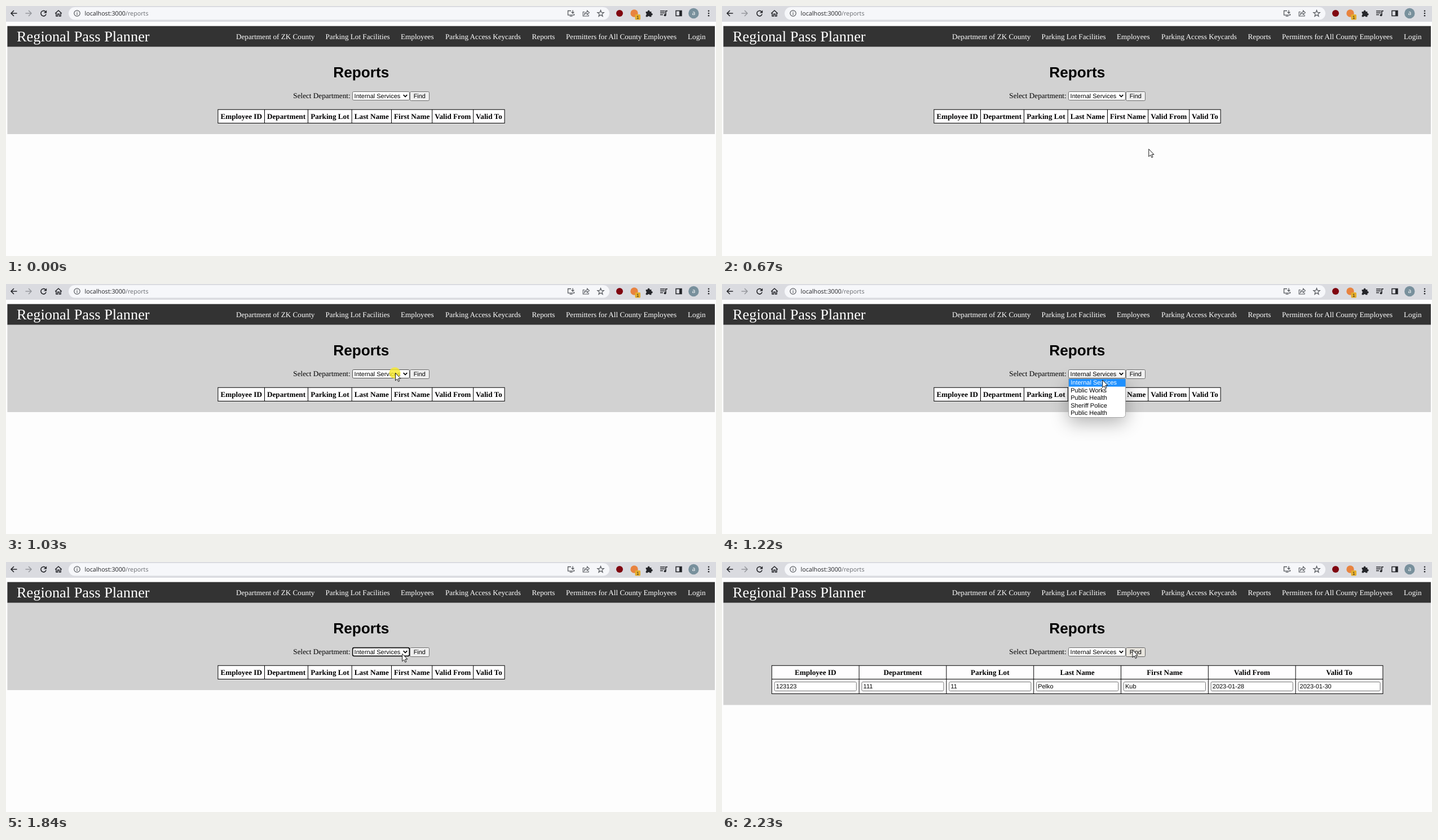
Write an HTML page with a canvas that moves like this. It is 1259 px wide and 445 px high and loops after 3100 ms.

```html
<!DOCTYPE html>
<html lang="en">
<head>
<meta charset="utf-8">
<title>Reports</title>
<style>
  html, body { margin: 0; width: 100%; height: 100%; overflow: hidden; background: #fdfdfd; }
  canvas { display: block; }
</style>
</head>
<body>
<canvas id="stage" width="1259" height="445"></canvas>
<script>
const ctx = document.getElementById('stage').getContext('2d');
ctx.textRendering = 'geometricPrecision';

const LOOP = 3100;
const SERIF = '"Liberation Serif", "Times New Roman", serif';
const SANS = '"Liberation Sans", Arial, sans-serif';
const UI = '"Open Sans", "Noto Sans", sans-serif';
const BODY = '13.18px ' + SERIF;
const CONTROL = '10.97px ' + SANS;

const NAV = [
  ['Department of ZK County', 408], ['Parking Lot Facilities', 566.5],
  ['Employees', 700], ['Parking Access Keycards', 779], ['Reports', 932.5],
  ['Permitters for All County Employees', 993], ['Login', 1209]
];
const HEADS = ['Employee ID', 'Department', 'Parking Lot', 'Last Name', 'First Name', 'Valid From', 'Valid To'];
const RECORD = ['123123', '111', '11', 'Pelko', 'Kub', '2023-01-28', '2023-01-30'];
const OPTIONS = ['Internal Services', 'Public Works', 'Public Health', 'Sheriff Police', 'Public Health'];
const NARROW = [375.4, 458, 535, 612.7, 683, 755.2, 828.2, 883.6];
const WIDE = NARROW.map((_, i) => 87.8 + i * 154.8);

function rect(x, y, w, h, color) {
  ctx.fillStyle = color;
  ctx.fillRect(x, y, w, h);
}

function round(x, y, w, h, r, fill, stroke, line = 1) {
  ctx.beginPath();
  ctx.roundRect(x, y, w, h, r);
  if (fill) { ctx.fillStyle = fill; ctx.fill(); }
  if (stroke) { ctx.strokeStyle = stroke; ctx.lineWidth = line; ctx.stroke(); }
}

function disc(x, y, r, color) {
  ctx.beginPath();
  ctx.arc(x, y, r, 0, Math.PI * 2);
  ctx.fillStyle = color;
  ctx.fill();
}

function text(str, x, y, font, color = '#000', align = 'left') {
  ctx.font = font;
  ctx.fillStyle = color;
  ctx.textAlign = align;
  ctx.fillText(str, x, y);
}

// Path drawn around its own centre.
function icon(x, y, d, stroke, width = 1.4, fill) {
  const path = new Path2D(d);
  ctx.save();
  ctx.translate(x, y);
  if (fill) { ctx.fillStyle = fill; ctx.fill(path); }
  if (stroke) { ctx.strokeStyle = stroke; ctx.lineWidth = width; ctx.stroke(path); }
  ctx.restore();
}

function toolbar() {
  const dark = '#25262a', mid = '#55585d';
  rect(0, 0, 1259, 28, '#dadbe0');
  round(111, 2, 959, 22.5, 11.25, '#f6f7fa');

  icon(14, 13, 'M5.5 0H-5M0 -5L-5 0L0 5', dark, 1.6);
  icon(40, 13, 'M-5.5 0H5M0 -5L5 0L0 5', '#96989d', 1.5);
  icon(66.5, 13.2, 'M3.4 -3.4A4.7 4.7 0 1 0 4.6 1.2', dark, 1.6);
  icon(66.5, 13.2, 'M5.6 -5.8V-.6H.4Z', null, 0, dark);
  icon(93, 13, 'M-5.8 .3L0 -5.1L5.8 .3M-4 -.8V5H-1.4V1.2H1.4V5H4V-.8', dark, 1.5);

  icon(126, 13, 'M5.2 0A5.2 5.2 0 1 1 -5.2 0A5.2 5.2 0 1 1 5.2 0M0 -.8V3M0 -3V-1.7', mid, 1.2);
  const font = '10.75px ' + UI;
  text('localhost:3000', 139.5, 17, font, '#202124');
  text('/reports', 139.5 + ctx.measureText('localhost:3000').width, 17, font, '#686b70');

  icon(1002, 13, 'M0 -4.5H-5.5V3.2H5.5V1M-2.5 5.2H2.5M3 -5.5V-.2M.6 -2.4L3 0L5.4 -2.4', mid, 1.3);
  icon(1028.5, 13, 'M-2.5 -2.5H-5.3V5H4.5V2.5M-3 2.3C-2.5 -1 -.5 -2.2 2 -2.2V-5L5.8 -1.2L2 2.4V0C-.5 0 -2 .8 -3 2.3Z', mid, 1.1);
  let star = '';
  for (let i = 0; i < 10; i++) {
    const a = i * Math.PI / 5, r = i % 2 ? 2.5 : 6;
    star += (i ? 'L' : 'M') + r * Math.sin(a) + ' ' + -r * Math.cos(a);
  }
  icon(1054.5, 13.5, star + 'Z', mid, 1.2);

  disc(1088, 13, 6, '#800610');
  disc(1114, 13, 6.7, '#e8833f');
  round(1115.5, 15, 9.5, 9.5, 1.5, '#e5ad2b');
  text('1', 1120.2, 22.7, '8px ' + SANS, '#222', 'center');
  icon(1140, 13.5, 'M-5.3 -3.4H-2.2A1.9 1.9 0 1 1 1.4 -3.4H4.4V-.5A1.8 1.8 0 1 1 4.4 3V5.8H1.3A1.8 1.8 0 0 0 -2.2 5.8H-5.3V2.7A1.8 1.8 0 0 0 -5.3 -.7Z', null, 0, dark);
  icon(1166, 13, 'M-6 -4H2.5M-6 -.8H2.5M-6 2.4H-1M4 3V-4.2H7', dark, 1.5);
  disc(1168.6, 16.2, 2, dark);
  icon(1193, 13, 'M-5 -4.5H5V4.5H-5Z', dark, 1.5);
  rect(1194, 8.5, 4, 9, dark);
  disc(1219.3, 13, 9.2, '#78909c');
  text('a', 1219.3, 16.3, '10.5px ' + UI, '#fff', 'center');
  for (const dy of [-4.3, 0, 4.3]) disc(1246, 13 + dy, 1.3, dark);
}

function header(height) {
  const left = 2.4, width = 1254.6;
  rect(left, 72, width, height, '#d2d2d2');
  rect(left, 35.7, width, 36.8, '#333');
  text('Regional Pass Planner', 19, 63, '26.35px ' + SERIF, '#fff');
  for (const [label, x] of NAV) text(label, x, 58.6, BODY, '#fff');
  text('Reports', 629.8, 126.5, 'bold 26.22px ' + SANS, '#000', 'center');
}

function form(focus, selectHover, buttonHover) {
  text('Select Department:', 509.3, 164, BODY);
  round(614.5, 152.5, 101, 15, 2, '#fff', selectHover ? '#4f4f4f' : '#6d6d6d');
  if (focus) round(614.7, 152.7, 100.6, 14.6, 2.5, null, '#101010', 1.7);
  text(OPTIONS[0], 617.6, 164, CONTROL);
  icon(708, 160, 'M-3.3 -1.8L0 1.6L3.3 -1.8', '#000', 1.7);
  round(716.5, 152.5, 34, 16, 2, buttonHover ? '#e8e5de' : '#efefef', buttonHover ? '#626262' : '#6d6d6d');
  text('Find', 733.3, 164, CONTROL, '#000', 'center');
}

function table(xs, record) {
  const left = xs[0], bottom = record ? 234 : 208;
  rect(left, 183.8, xs[7] - left + 1, bottom - 182.8, '#000');
  HEADS.forEach((head, i) => {
    const x = xs[i] + 1, w = xs[i + 1] - x;
    rect(x, 184.8, w, 23.2, '#fefdfe');
    text(head, x + w / 2, 200.5, 'bold ' + BODY, '#000', 'center');
    if (!record) return;
    rect(x, 209, w, 25, '#fefdfe');
    round(x + 4.3, 213.5, 145.2, 16, 2, '#fff', '#767676');
    text(record[i], x + 7, 225, CONTROL);
  });
}

function popup() {
  ctx.save();
  ctx.shadowColor = 'rgba(0,0,0,.3)';
  ctx.shadowBlur = 32;
  ctx.shadowOffsetY = 9;
  round(614.5, 168.5, 101, 69, [0, 0, 5, 5], '#fff');
  ctx.restore();
  round(614.5, 168.5, 101, 69, [0, 0, 5, 5], '#fff', '#a5a5a5');
  rect(615, 169, 100.5, 13.7, '#1e90ff');
  OPTIONS.forEach((label, i) => text(label, 618.3, 179 + i * 13.6, CONTROL, i ? '#000' : '#fff'));
}

function cursor({ x, y }) {
  icon(x + .5, y + .5, 'M0 0V13.4L3.1 10.6L5.2 15.1L7.2 14.2L5.2 9.7H9.2Z', '#000', .9, '#fff');
}

const progress = (t, from, to) => Math.min(1, Math.max(0, (t - from) / (to - from)));
const smooth = p => p * p * (3 - 2 * p);
const mix = (a, b, p) => a + (b - a) * p;
const bend = (a, c, b, p) => mix(mix(a, c, p), mix(c, b, p), p);

function pointer(t) {
  if (t < 1060) {
    const p = 1 - Math.pow(1 - progress(t, 420, 930), 1.7);
    return { x: bend(814, 806, 690, p), y: bend(417, 306, 158, p) };
  }
  if (t < 1590) {
    const p = smooth(progress(t, 1060, 1220));
    return { x: mix(690, t < 1350 ? 673.5 : 672, p), y: mix(158, 171, p) };
  }
  const p = smooth(progress(t, 1560, 2070));
  return { x: mix(672, 727.5, p), y: mix(171, 156, p) };
}

function draw(time) {
  // Pointer samples arrive every 30 ms.
  const t = Math.floor(time / 10) * 10;
  const shown = t >= 420;
  const at = pointer(t - t % 30);
  const onRow = shown && at.y >= 152 && at.y <= 169;
  const found = t >= 2230;
  const open = t >= 1060 && t < 1500;
  const click = (t >= 1030 && t < 1130) || (t >= 1350 && t < 1470) || (t >= 2100 && t < 2230);

  rect(0, 0, 1259, 445, '#fdfdfd');
  toolbar();
  header(found ? 182.5 : 156);
  form(t >= 1500 && t < 2130, onRow && at.x >= 614 && at.x < 716, onRow && at.x >= 716 && at.x < 751);
  table(found ? WIDE : NARROW, found ? RECORD : null);
  if (open) popup();
  if (click) disc(at.x - .5, at.y + .3, 10, 'rgba(247,234,40,.8)');
  if (shown) cursor(at);
}

const start = performance.now();
function tick() {
  draw((performance.now() - start) % LOOP);
  requestAnimationFrame(tick);
}
tick();
</script>
</body>
</html>
```
